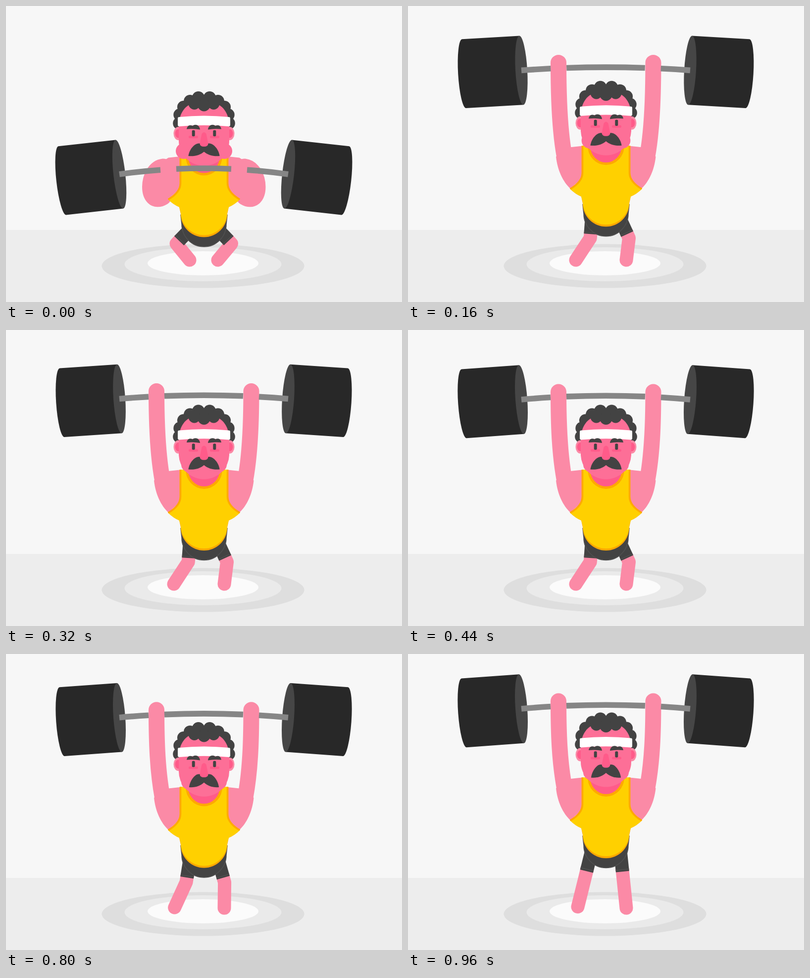
Write an HTML page that moves like this. It is 800x600 px and loops after 1000 ms.

```html
<!DOCTYPE html>
<html lang="en">
<head>
<meta charset="utf-8">
<title>Weightlifter</title>
<style>
  html, body { margin: 0; width: 100%; height: 100%; overflow: hidden; background: #f7f7f7; }
  svg { display: block; width: 100vw; height: 100vh; }
</style>
</head>
<body>
<svg id="stage" viewBox="0 0 800 600"></svg>
<script>
const LOOP = 1000, STEP = 40;
const C = {
  skin: '#fb8aa6', face: '#fd6f97', deep: '#ff5b8a', dark: '#434343', hem: '#505050',
  shirt: '#ffd000', trim: '#ffa800', bar: '#868686', plate: '#282828', disc: '#464646'
};

// Arm curves: hand and first control hang on the bar, second control and shoulder on the body
const ARMS = {
  racked: [[318, -15.5], [282, -11], [282, 388], [318, 366]],
  bent: [[314, -13.5], [255, -3], [255, 298], [320, 302]],
  raised: [[304, -15.5], [304, 49], [306, 250], [316, 304]]
};

const lerp = (a, b, k) => a + (b - a) * k;
const clamp = k => Math.max(0, Math.min(1, k));

// Fast push with a damped bounce at the top
function liftAt(t) {
  if (t < 160) return 1.053 * Math.sin(Math.PI * t / 320) ** 1.56;
  return 1 + 0.053 * Math.exp((160 - t) / 82) * Math.cos(Math.PI * (t - 160) / 80);
}

function poseAt(t) {
  const push = clamp(t / 160);
  const fold = Math.sin(Math.PI * push);
  const crouch = Math.exp(-t / 35);
  const lift = liftAt(t);
  const rise = 1 - (1 - clamp((t - 720) / 240)) ** 1.3;
  return {
    push, fold, crouch, lift, rise,
    body: 21.5 * crouch - 33 * rise,
    bar: 341 - 200 * lift - 30 * rise,
    flex: 7.8 + 4.2 * crouch - 1.6 * Math.sin(Math.PI * clamp(t / 360)),
    puff: clamp(1 - t / 230),
    twitch: clamp((t - 600) / 120)
  };
}

const path = (d, fill) => `<path d="${d}" fill="${fill}"/>`;
const line = (d, color, w, fill = 'none') =>
  `<path d="${d}" fill="${fill}" stroke="${color}" stroke-width="${w}"/>`;
const limb = (...args) => `<g stroke-linecap="round" stroke-linejoin="round">${line(...args)}</g>`;
const oval = (x, y, rx, ry, fill) => `<ellipse cx="${x}" cy="${y}" rx="${rx}" ry="${ry}" fill="${fill}"/>`;
const box = (x, y, w, h, r, fill) =>
  `<rect x="${x}" y="${y}" width="${w}" height="${h}" rx="${r}" fill="${fill}"/>`;
const shift = (y, s) => `<g transform="translate(0 ${y})">${s}</g>`;
const both = (s, sum = 800) => s + `<g transform="translate(${sum} 0) scale(-1 1)">${s}</g>`;

const FLOOR = box(0, 0, 800, 600, 0, '#f7f7f7') + box(0, 454, 800, 146, 0, '#ededed')
  + oval(398, 527, 204.5, 44.5, '#dedede')
  + oval(398, 523.5, 158.5, 34.5, '#eaeaea')
  + oval(398, 521.5, 112, 24.5, '#fbfbfb');

const PELVIS = line('M353 402L355 421A45 45.5 0 0 0 445 421L447 402Z', C.hem, 1.5, C.dark);

const SHOULDER = path('M356 283L328 286L299 305C302 333 313 356 328 370L356 345Z', C.skin);

const shirtShape = (y, fill) => path(
  `M351 283H449V338C449 353 461 362 473 370Q462 381 450 386L447 ${y}A47 47 0 0 1 353 ${y}` +
  'L350 386Q338 381 327 370C339 362 351 353 351 338Z', fill);
const SHIRT = shirtShape(400, C.trim) + shirtShape(396, C.shirt)
  + both(line('M352.4 283V338C352.4 353 340.5 363 328 370.5', C.trim, 3.6))
  + path('M363 283A37 39 0 0 0 437 283Z', C.trim)
  + path('M368 283A32 34 0 0 0 432 283Z', C.deep);

// Curls sit evenly on an arc around the skull
const curl = (_, i) => {
  const a = (13 + 21 * i) * Math.PI / 180;
  return oval(400 - 50.5 * Math.sin(a), 211 - 47.5 * Math.cos(a), 12.7, 12.7, C.dark);
};
const HAIR = oval(400, 198, 50, 38, C.dark) + both(Array.from({ length: 5 }, curl).join(''));

const SKULL = path('M349 222L352 203C355 193 361 185 369 180H431C439 185 445 193 448 203'
  + 'L451 222V252A51 51 0 0 1 349 252Z', C.face);

const FRINGE = both(oval(380.5, 176.5, 12, 12.5, C.dark)) + oval(400, 180, 12.5, 12.5, C.dark);

const BAND = path('M350 204Q400 199 450 204Q453 204 453 207V220Q453 223 450 223'
  + 'Q400 218.5 350 223Q347 223 347 220V207Q347 204 350 204Z', '#fff');

const EAR = oval(348, 237.5, 9.5, 13.5, C.skin) + oval(348, 237.5, 6.5, 9, C.deep);

const EYES = both(
  box(369, 242, 19, 5, 2, C.deep)
  + box(375.7, 230.8, 6, 12.4, 2.2, C.dark)
  + path('M365 228.5C366 221 372 219 377 222C382 217.5 391 220 392 229.5Q379 227 365 228.5Z', C.dark));

const NOSE = path('M395.5 238Q400 232 404.5 238L408.5 258Q408 264 400 264Q392 264 391.5 258Z', C.deep);

function leg(hipX, hipY, footX, footY, bulge) {
  const kx = lerp(hipX, footX, 0.46) + bulge, ky = lerp(hipY, footY, 0.46);
  const thigh = k => `${lerp(hipX, kx, k)} ${lerp(hipY, ky, k)}`;
  return limb(`M${thigh(0.7)}L${kx} ${ky}L${footX} ${footY}`, C.skin, 27)
    + line(`M${thigh(0)}L${thigh(0.79)}`, C.dark, 27)
    + line(`M${thigh(0.7)}L${thigh(0.73)}`, C.hem, 27);
}

function legs({ push, lift, rise, body }) {
  const reach = Math.min(1, lift), hip = 432 + body;
  const bulge = from => lerp(from, 12, reach) * (1 - rise);
  return leg(371, hip, 371 - 32 * push + 4 * rise, 515 - 2.5 * rise, bulge(-27))
    + leg(429, hip, 428 + 13 * push, 515, bulge(27));
}

function arm({ push, lift, bar, body }) {
  const [from, to, k] = push < 0.5
    ? [ARMS.racked, ARMS.bent, 2 * push]
    : [ARMS.bent, ARMS.raised, 2 * push - 1];
  const p = from.map(([x, y], i) =>
    `${lerp(x, to[i][0], k)} ${lerp(y, to[i][1], k) + (i < 2 ? bar : body)}`);
  // A folded arm closes on itself
  const fill = lift < 0.3 ? C.skin : 'none';
  return limb(`M${p[0]}C${p.slice(1).join(' ')}`, C.skin, 32, fill) + shift(body, SHOULDER);
}

function head({ puff, fold, twitch }) {
  const x = 368.3 + 3.5 * fold + 1.5 * twitch, y = 283 + 4 * fold + twitch;
  const cheek = oval(370 - 11 * puff, 273, 16, 16, C.face);
  const whisker = path(`M400.5 264C397 258 391 256 385 258.5C${x + 9} 262 ${x + 2} 271 ${x} ${y}`
    + `C${x + 12} ${y + 1.5} 393 281 400.5 274Z`, C.dark);
  return HAIR + both(EAR) + SKULL + both(cheek) + FRINGE + BAND + EYES + both(whisker) + NOSE;
}

function barbell({ bar, flex, crouch, fold }) {
  const left = 229, mid = 399.5, half = mid - left;
  const yAt = x => bar - flex * (1 - ((x - mid) / half) ** 2);
  const rod = (a, b) => {
    const slope = 2 * flex * (a - mid) / half ** 2;
    return line(`M${a} ${yAt(a)}Q${(a + b) / 2} ${yAt(a) + slope * (b - a) / 2} ${b} ${yAt(b)}`, C.bar, 11.6);
  };
  const plate = `<g transform="translate(${left} ${bar}) rotate(${-flex * 0.53})">`
    + path('M0 -70H-116A12 70 0 0 0 -116 70H0Z', C.plate) + oval(0, 0, 12, 70, C.disc) + '</g>';
  // The fists hide part of the rod
  const fist = 288 + 24 * crouch, end = fist + 32 + 7 * fold;
  return both(plate + rod(left, fist), 2 * mid) + rod(end, 2 * mid - end);
}

function scene(t) {
  const pose = poseAt(t);
  return FLOOR
    + legs(pose)
    + shift(pose.body, PELVIS)
    + both(arm(pose), 799.5)
    + shift(pose.body, SHIRT)
    + shift(pose.body - 0.5, head(pose))
    + barbell(pose);
}

const stage = document.getElementById('stage');
const start = performance.now();
let shown = -1;

function tick() {
  const t = Math.floor(((performance.now() - start) % LOOP) / STEP) * STEP;
  if (t !== shown) {
    stage.innerHTML = scene(t);
    shown = t;
  }
  requestAnimationFrame(tick);
}
tick();
</script>
</body>
</html>
```
